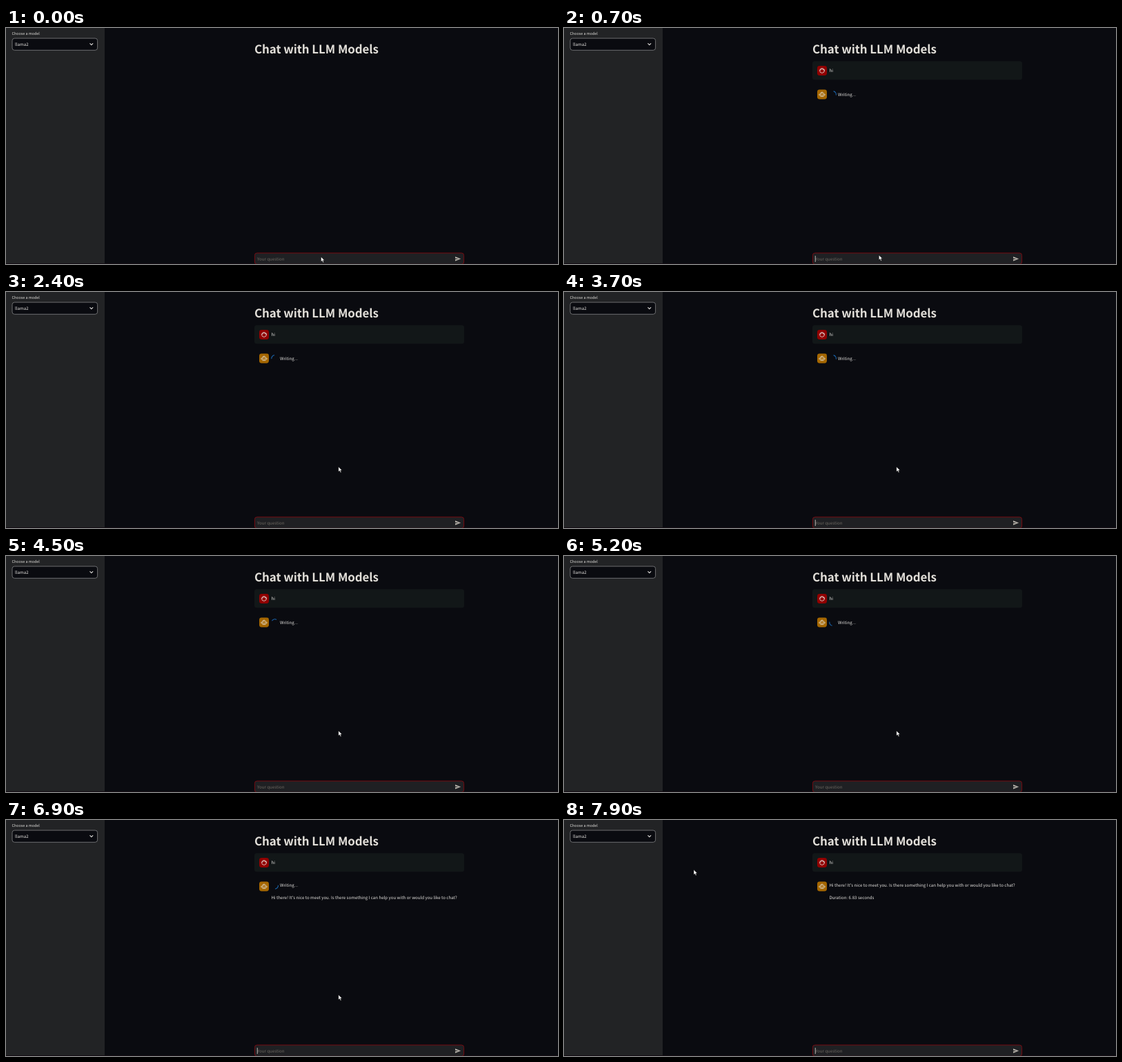
These frames come from a looping animation (800x343 px, 8000 ms). An HTML page:

```html
<!DOCTYPE html>
<html lang="en">
<head>
<meta charset="utf-8">
<title>Chat with LLM Models</title>
<style>
  html, body { margin: 0; width: 100%; height: 100%; overflow: hidden; background: #0a0b10; }
  svg { display: block; width: 100vw; height: 100vh; }
  text {
    font: 6.17px "Noto Sans CJK JP", "Noto Sans CJK SC", "Noto Sans CJK", "Open Sans", sans-serif;
    fill: #e6e4e0;
    text-rendering: geometricPrecision;
    white-space: pre;
  }
  .title { font-size: 16.96px; font-weight: 700; letter-spacing: -.005em; fill: #e2dfd9; }
  .label { font-size: 5.4px; }
  .hint { fill: #6d6860; }
  .line { fill: none; stroke: #e6e4e0; stroke-width: .8; stroke-linecap: round; stroke-linejoin: round; }
</style>
</head>
<body>
<svg viewBox="0 0 800 343" preserveAspectRatio="none">
  <rect width="800" height="343" fill="#0a0b10"/>
  <rect width="143" height="343" fill="#222325"/>
  <rect y="342" width="800" height="1" fill="#140c13"/>

  <text class="label" x="8.5" y="10.2">Choose a model</text>
  <rect x="9" y="15" width="123.6" height="17.3" rx="3.4" fill="#0a0b10" stroke="#77787a" stroke-width=".9"/>
  <text x="13" y="26.2">llama2</text>
  <path class="line" d="M121.8 22.7l2 2 2-2" style="stroke-width:1.1"/>

  <text class="title" x="360" y="36.6">Chat with LLM Models</text>

  <g id="question">
    <rect x="360" y="48.2" width="304" height="27" rx="3.5" fill="#121718"/>
    <rect x="367" y="55" width="14" height="14" rx="3.4" fill="#900000"/>
    <g class="line">
      <circle cx="374" cy="62" r="3.4"/>
      <path d="M370.8 61.4q2.2-.4 2.9-2.2 1.2 1.8 3.5 1.6"/>
    </g>
    <text x="384.4" y="64.2">hi</text>
  </g>

  <g id="reply">
    <rect x="367" y="89.4" width="14" height="14" rx="3.4" fill="#a56700"/>
    <g class="line">
      <rect x="371.2" y="94.4" width="5.6" height="5" rx="1.2"/>
      <path d="M374 94.2v-1.4M370 96.3v1.2M378 96.3v1.2M372.8 96.3v.1M375.2 96.3v.1M373 98h2"/>
    </g>
    <g id="writing">
      <path id="spinner" d="M-3.4-3.4A4.8 4.8 0 0 1 3.4-3.4" fill="none" stroke="#1a64ab" stroke-width="1.1"/>
      <text x="397" y="98.6">Writing...</text>
    </g>
    <text id="answer" x="384.4"></text>
    <text id="duration" x="384.4" y="115.2">Duration: 6.83 seconds</text>
  </g>

  <rect x="360.4" y="327" width="303.2" height="16.4" rx="3.4" fill="#1f2023" stroke="#7f0b10" stroke-width=".9"/>
  <text id="field" x="364" y="337.9"></text>
  <rect id="caret" x="363.8" y="331" width=".8" height="9" fill="#d8d5cf"/>
  <path d="M651 332.2l8.2 3.3-8.2 3.3v-2.6l5-.7-5-.7z" fill="#b5b0a8"/>

  <path id="mouse" d="M0 0v7.3l1.7-1.5 1.2 2.7 1.3-.6-1.2-2.6h2.3z" fill="#fff" stroke="#000" stroke-width=".5"/>
</svg>
<script>
const LOOP = 8000, STEP = 100;
const SENT = 300, THINK = 700, STREAM = 5400, STREAM_END = 6800, DONE = 7400;
const WORDS = "Hi there! It's nice to meet you. Is there something I can help you with or would you like to chat?".split(" ");
const MOUSE = [
  [0, 456.5, 332.5], [600, 456.5, 332.5], [1300, 453, 287], [1600, 453, 287],
  [2300, 481.8, 254], [7500, 481.8, 254], [7900, 188, 72.3], [LOOP, 188, 72.3]
];

const el = id => document.getElementById(id);
const show = (id, on) => el(id).setAttribute("visibility", on ? "inherit" : "hidden");
const move = (id, x, y, turn = 0) =>
  el(id).setAttribute("transform", `translate(${x} ${y}) rotate(${turn})`);

function mouseAt(t) {
  const i = MOUSE.findIndex((p, n) => n && t <= p[0]);
  const [t0, x0, y0] = MOUSE[i - 1], [t1, x1, y1] = MOUSE[i];
  const k = (t - t0) / (t1 - t0), ease = k * k * (3 - 2 * k);
  return [x0 + (x1 - x0) * ease, y0 + (y1 - y0) * ease];
}

function render(t) {
  const streaming = t >= STREAM && t < DONE, done = t >= DONE;
  const lift = streaming ? -1.3 : 0;

  show("question", t >= SENT);
  show("reply", t >= THINK);
  show("writing", t >= THINK && !done);
  show("duration", done);
  move("writing", 0, lift);
  move("spinner", 389.6, 96.6, 165 + t * .36);

  const progress = (t - STREAM + STEP) / (STREAM_END - STREAM + STEP);
  const count = Math.max(0, Math.floor(Math.min(1, progress) * WORDS.length));
  el("answer").textContent = WORDS.slice(0, count).join(" ");
  el("answer").setAttribute("y", done ? 97.3 : 115.2);

  const typed = t >= 100 && t < SENT ? "hi".slice(0, t / 100) : "";
  el("field").textContent = typed || "Your question";
  el("field").setAttribute("class", typed ? "" : "hint");
  show("caret", t >= THINK && (t + 400) % 1000 < 500);

  move("mouse", ...mouseAt(t));
}

function tick(now) {
  render(Math.floor(now % LOOP / STEP) * STEP);
  requestAnimationFrame(tick);
}
render(0);
requestAnimationFrame(tick);
</script>
</body>
</html>
```
